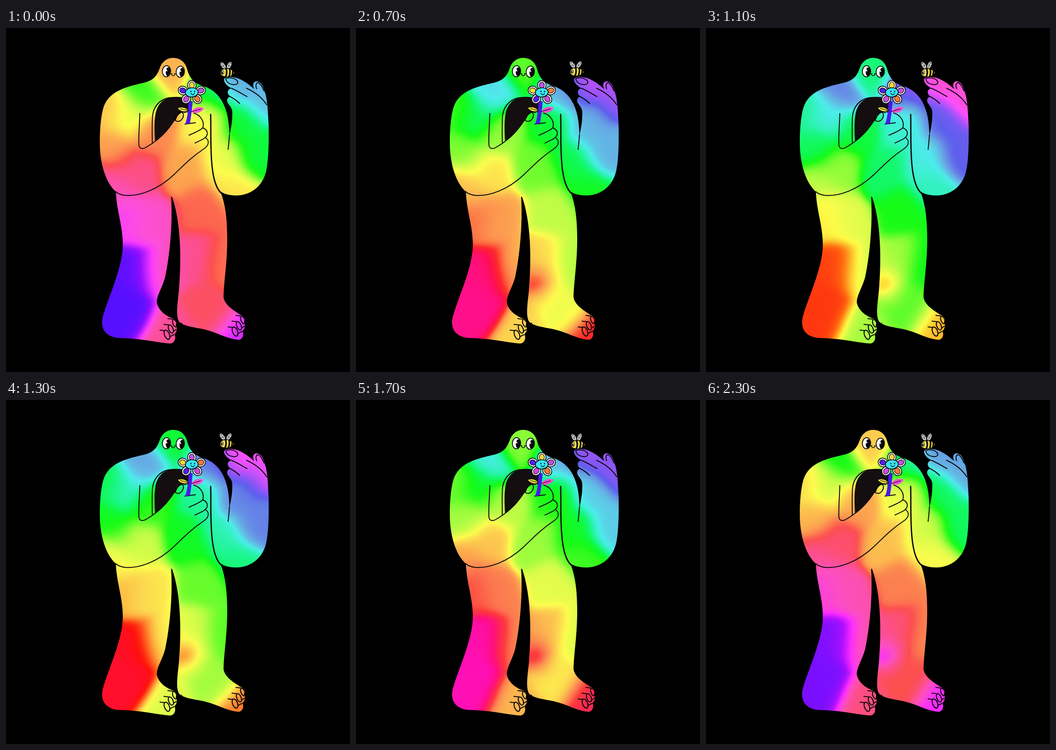
Recreate the animation shown at these times as an HTML page with a canvas. Size 748 by 748 pixels, loop 2400 ms.

```html
<!DOCTYPE html>
<html lang="en">
<head>
<meta charset="utf-8">
<title>Rainbow giant with a flower and a bee</title>
<style>
  html, body { margin: 0; width: 100%; height: 100%; overflow: hidden; background: #000; }
  canvas { display: block; width: 748px; height: 748px; }
</style>
</head>
<body>
<canvas id="stage" width="748" height="748"></canvas>
<script>
const ctx = document.getElementById('stage').getContext('2d');
const INK = '#0c080a', TAU = Math.PI * 2;
const STEP = 100, STEPS = 24, CYCLE = 6, PEAK = 11;

const clamp = (v, a, b) => Math.max(a, Math.min(b, v));
const lerp = (a, b, k) => a + (b - a) * k;
const bump = (v, mid, width) => Math.exp(-(((v - mid) / width) ** 2));

// ---- Colour field ---------------------------------------------------
// Key hues: x, y, degrees
const anchors = [
  [365, 90, 394], [290, 135, 475], [260, 190, 432], [220, 180, 398],
  [235, 270, 388], [320, 220, 380], [290, 310, 340], [235, 345, 328],
  [425, 210, 418], [395, 310, 390], [300, 410, 318], [262, 410, 302],
  [290, 525, 260], [260, 610, 258], [345, 520, 322], [350, 660, 335],
  [425, 400, 368], [415, 510, 336], [478, 510, 372], [440, 615, 354],
  [502, 665, 288], [440, 140, 496], [480, 290, 425], [500, 345, 412],
  [550, 270, 492], [505, 200, 490], [560, 150, 560], [495, 115, 565]
];

const X0 = 200, Y0 = 60, CELL = 4, COLS = 94, ROWS = 158;

function hueAt(x, y) {
  let sum = 0, total = 0;
  for (const [ax, ay, hue] of anchors) {
    const w = Math.exp(-((x - ax) ** 2 + (y - ay) ** 2) / 1500);
    sum += w * hue;
    total += w;
  }
  return sum / total;
}

const fields = Array.from({ length: CYCLE }, (_, n) => {
  const turn = n / CYCLE * TAU;
  return Float32Array.from({ length: COLS * ROWS }, (_, i) => {
    const x = X0 + (i % COLS + .5) * CELL;
    const y = Y0 + (Math.floor(i / COLS) + .5) * CELL;
    const knee = bump(x, 393, 32) * bump(y, 560, 36) * Math.sin(turn) ** 2;
    return hueAt(x + 7 * Math.sin(y / 38 + turn), y + 7 * Math.cos(x / 34 + turn)) - 48 * knee;
  });
});

// Pastel, but strong at green; the violet foot is fully saturated
function colour(base, shift) {
  const h = (base + shift) % 360;
  const deep = clamp((312 - base) / 40, 0, 1);
  const s = lerp(.97 - .27 * bump(h, 210, 45), 1, deep);
  const l = lerp(.65 - .13 * bump(h, 135, 40), .53, deep);
  const a = s * Math.min(l, 1 - l);
  return [0, 8, 4].map(n => {
    const k = (n + h / 30) % 12;
    return 255 * (l - a * Math.max(-1, Math.min(k - 3, 9 - k, 1)));
  });
}

const tint = document.createElement('canvas');
tint.width = COLS;
tint.height = ROWS;
const tintCtx = tint.getContext('2d');
const pixels = tintCtx.createImageData(COLS, ROWS);

function paintTint(step) {
  const swing = step < PEAK ? step / PEAK : (STEPS - step) / (STEPS - PEAK);
  fields[step % CYCLE].forEach((hue, i) => pixels.data.set([...colour(hue, 112 * swing), 255], i * 4));
  tintCtx.putImageData(pixels, 0, 0);
}

// ---- Shapes ---------------------------------------------------------
const body = new Path2D(`M363 65 C380 65 390 75 394 90 C398 107 408 119 425 125
  C450 132 466 148 475 170 C484 192 485 212 486 235 C489 218 492 205 492 190
  C493 178 490 173 485 167 C479 160 479 152 488 149 C479 142 481 134 490 131
  C481 126 475 120 474 113 C474 106 486 105 500 108 C514 112 526 121 540 133
  C535 123 538 116 545 116 C557 117 560 130 564 143 C569 160 570 190 571 210
  C572 260 570 290 566 310 C557 350 525 366 495 364 C480 363 471 359 466 355
  C478 385 481 420 481 460 C481 510 474 550 473 585 C475 600 490 612 514 626
  C521 630 519 637 517 640 C522 645 519 655 514 659 C518 666 515 677 506 678
  C480 676 460 662 430 655 C405 650 385 648 376 638 C369 625 373 600 376 570
  C382 500 380 420 361 367 L359 367 C363 430 355 500 346 542 C339 567 327 582 328 598
  C333 617 350 627 366 633 C372 637 370 644 369 647 C374 652 371 662 366 666
  C370 672 368 684 358 686 C330 685 300 675 245 674 C218 672 205 655 210 630
  C220 590 255 520 254 470 C254 430 240 395 239 356
  C215 335 204 290 204 250 C204 210 208 180 215 165 C230 135 265 127 300 119
  C320 114 328 105 334 88 C339 73 350 65 363 65Z`);

const hollow = new Path2D(`M324 247 C323 225 322 205 325 188 C328 168 341 152 362 151
  C376 150 390 152 400 158 L395 184 C385 179 375 186 368 198 C356 216 341 235 324 247Z`);

const lines = new Path2D(`M291 186 C290 215 288 238 289 254 C290 264 298 264 307 258
  C341 238 356 216 367 199 C374 186 382 180 390 184
  M318 249 C318 225 317 205 319 188 C323 165 341 151 362 151 C374 150 385 151 394 155
  M408 185 C423 189 432 203 428 217 C422 223 410 228 398 233
  M428 217 C440 222 441 233 431 240 C425 244 417 247 411 250
  M433 238 C443 244 442 255 430 263 C400 283 385 300 365 319
  C330 352 290 366 260 364 C250 363 243 360 239 356
  M389 209 L412 206
  M368 201 C372 204 378 204 382 199 C387 193 387 185 382 183 C376 184 371 191 368 201
  M486 232 C485 245 484 255 483 264
  M490 131 C502 136 513 143 524 149 M487 149 C495 153 502 158 508 164
  M523 131 C543 140 558 153 567 167
  M478 110 C483 107 496 108 502 114 C507 120 502 124 494 123 C486 122 479 118 478 110
  M545 132 C542 125 544 118 549 119 C555 122 558 129 561 137`);

const armLine = new Path2D('M445 188 C446 220 444 262 448 300 C451 330 457 350 469 360');

function at(x, y, angle, draw) {
  ctx.save();
  ctx.translate(x, y);
  ctx.rotate(angle);
  draw();
  ctx.restore();
}

function stroke(width, path, color = INK) {
  ctx.lineWidth = width;
  ctx.strokeStyle = color;
  path ? ctx.stroke(path) : ctx.stroke();
}

function fill(path, color) {
  ctx.fillStyle = color;
  ctx.fill(path);
}

function oval(x, y, rx, ry, color, line = 0, angle = 0) {
  ctx.beginPath();
  ctx.ellipse(x, y, rx, ry, angle, 0, TAU);
  if (color) {
    ctx.fillStyle = color;
    ctx.fill();
  }
  if (line) stroke(line);
}

function toes(x, y) {
  for (let i = 0; i < 3; i++) at(x + 8.5 * i, y - 12.5 * i, 0, () => {
    oval(0, 0, 5.4 - .6 * i, 10.5 - i, null, 2.2, -.38);
    stroke(2.2, new Path2D('M-15 -10 L-5 -9 M6 5 C9 2 12 1 15 0'));
  });
}

function eye(x, y, tilt) {
  at(x, y, tilt, () => {
    oval(0, 0, 9, 12.2, '#fff', 1.8);
    oval(3.6, 1, 5.2, 9.8, '#080608');
    fill(new Path2D('M2.5 0 L-3 -8 L-5 0Z'), '#fff');
  });
}

function face() {
  eye(349, 94, .05);
  eye(379, 95, .1);
  stroke(1.5, new Path2D('M360 100 C361 105 366 105 367.5 100 M358.5 100 L361 99 M366.5 99 L369 100'));
}

// ---- Flower ---------------------------------------------------------
const petalInk = ['#f0d936', '#bd55e2', '#ff7d32', '#d04be0', '#5420ee'];
const leaf = new Path2D('M0 0 C5 -9 16 -13 27 -8 C22 1 10 6 0 0Z');
const vein = new Path2D('M0 0 C8 -3 14 -4 20 -6');

function flower(phase, turn) {
  const sway = .1 * Math.cos(turn) - .07;
  fill(new Path2D('M399 158 L406 160 C404 180 402 195 400 207 L389 210 C394 200 396 180 397 160Z'), '#4a18ee');
  at(403, 182, sway, () => { fill(leaf, '#f54fd8'); stroke(1.2, vein); });
  at(397, 180, -sway / 2, () => {
    ctx.scale(-.9, .8);
    fill(leaf, '#e9dc3c');
    stroke(1.6, leaf);
    stroke(1.2, vein);
  });
  petalInk.forEach((_, i) => {
    const angle = i / 5 * TAU;
    at(404 + 20.5 * Math.sin(angle), 141 - 16.5 * Math.cos(angle), angle, () => {
      oval(0, 0, 9.3, 10.3, '#fff', 1.7);
      oval(0, 0, 5.6, 7, petalInk[(i + phase) % 5], 1.2);
    });
  });
  oval(404, 140, 14, 10, '#36e4f2', 1.7, -.06);
  oval(402, 138, 1.3, 1.6, INK);
  oval(410, 138, 1.3, 1.6, INK);
  stroke(1.3, new Path2D('M402 142 C404 146 408 146 410 142'));
}

// ---- Bee ------------------------------------------------------------
const shell = new Path2D('M-14 -2 C-12 -10 4 -10 10 -6 C13 -4 14 -2 16 0 C12 8 5 10 -3 9 C-11 9 -16 5 -14 -2Z');
const stripes = new Path2D('M-4 -11 C0 -4 0 3 -4 11 M4 -11 C7 -4 7 3 3 11 M11 -9 C13 -3 13 3 9 10');

function wing(x, angle) {
  at(x, -8, angle, () => {
    oval(0, -9, 4.6, 8.5, '#d5d5d5', 1);
    stroke(.9, new Path2D('M0 0 L0 -16 M0 -6 L-4 -11 M0 -6 L4 -11 M-3.5 -14 L3.5 -14'), '#444');
  });
}

function bee(turn) {
  const spread = .08 + .08 * Math.sin(turn);
  at(481 - 1.5 * Math.sin(turn), 95 + 2.2 * Math.cos(turn + .5), spread / 4, () => {
    wing(-4, -.55 - spread);
    wing(0, .4 + spread);
    fill(shell, '#f1df47');
    ctx.save();
    ctx.clip(shell);
    stroke(3.4, stripes);
    ctx.restore();
    stroke(1.4, shell);
    oval(-10, 0, 2.8, 3.8, '#fff', 1);
    oval(-10.5, .8, 1.6, 2.4, INK);
  });
}

// ---- Frame ----------------------------------------------------------
function draw(step) {
  const phase = step % CYCLE, turn = phase / CYCLE * TAU;
  ctx.fillStyle = '#000';
  ctx.fillRect(0, 0, 748, 748);
  ctx.lineCap = ctx.lineJoin = 'round';

  paintTint(step);
  ctx.save();
  ctx.clip(body);
  ctx.imageSmoothingQuality = 'high';
  ctx.drawImage(tint, X0, Y0, COLS * CELL, ROWS * CELL);
  toes(350, 667);
  toes(498, 660);
  ctx.restore();

  fill(hollow, '#140e10');
  stroke(2, lines);
  stroke(2.8, armLine);
  face();
  flower(phase, turn);
  bee(turn);
}

let shown = -1;
function tick() {
  const step = Math.floor(performance.now() / STEP) % STEPS;
  if (step !== shown) draw(shown = step);
  requestAnimationFrame(tick);
}
tick();
</script>
</body>
</html>
```
